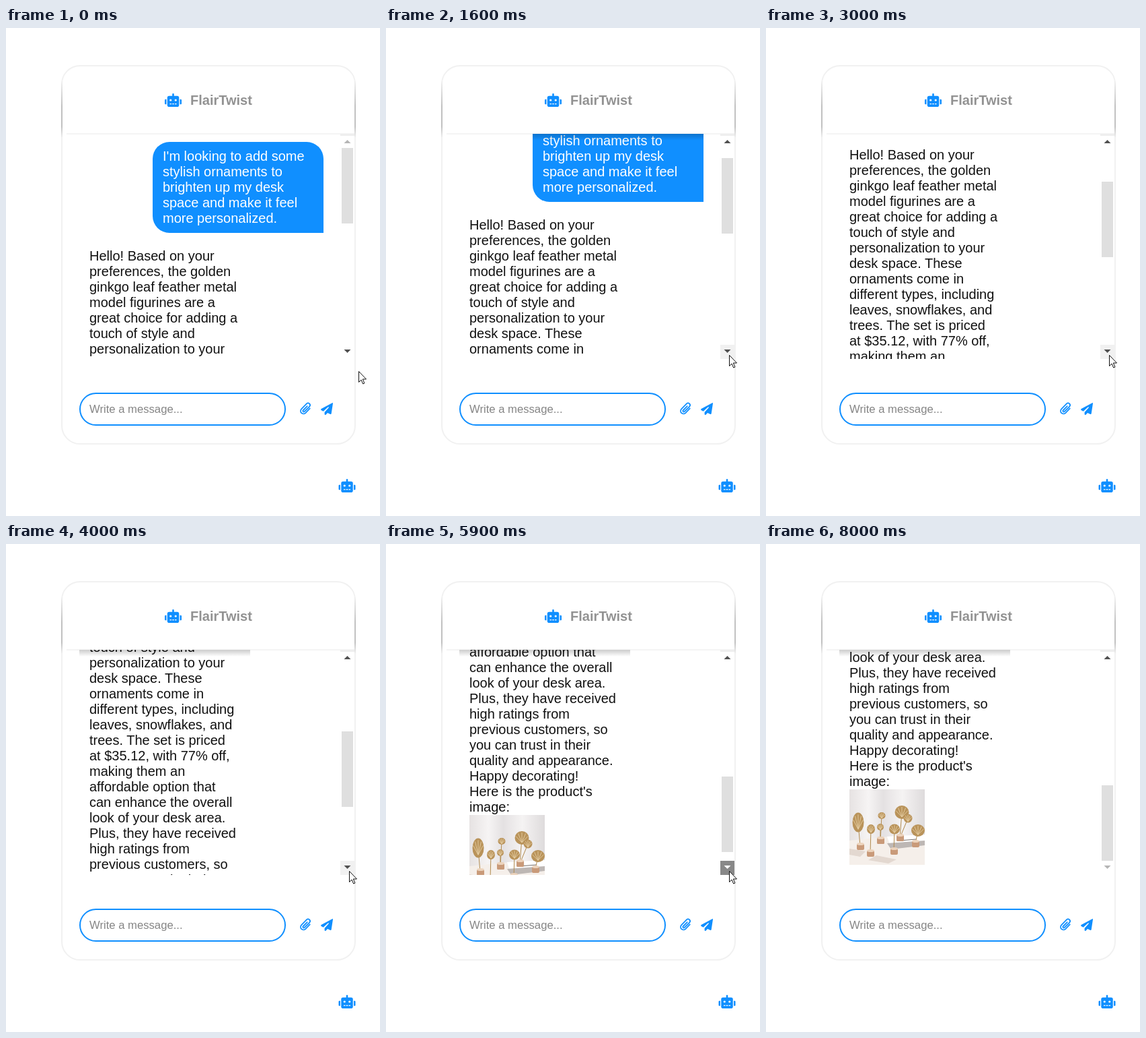
These frames come from a looping animation (556 by 724 pixels, 8100 ms). An HTML page:

```html
<!DOCTYPE html>
<html lang="en">
<head>
<meta charset="utf-8">
<title>Chat</title>
<style>
  html, body { margin: 0; width: 100%; height: 100%; overflow: hidden; background: #fff; }
  body { position: relative; font: 20px/23px "Liberation Sans", Arial, sans-serif; }
  body *, .bubble::after { box-sizing: border-box; }
  .panel, .edge, .line, .view, .input, h1, .stage, .bubble, .bubble::after { position: absolute; }
  .panel { left: 82px; top: 55px; width: 438px; height: 563px; border: 2px solid #f1f1f1; border-radius: 28px; }
  .edge { top: 78px; width: 2px; height: 85px; background: linear-gradient(#0000, #0003 45%, #0003 80%, #0000); }
  .line { left: 90px; top: 156px; width: 428px; height: 2px; background: #f4f4f4; }
  h1 { left: 274px; top: 96px; margin: 0; font-size: 20px; line-height: 23px; color: #929292; }
  .view { left: 84px; top: 157px; width: 412px; height: 334px; overflow: hidden; }
  .bubble { width: 254px; padding: 10px 15px; white-space: pre; overflow: hidden; }
  .bubble::after { content: ""; left: 0; top: calc(var(--s) - var(--y)); width: 100%; height: 10px;
    background: linear-gradient(#0003, #0000); }
  .user { --y: 12px; left: 134px; top: 12px; color: #fff; background: #108fff; border-radius: 25px 25px 0 25px; }
  .bot { --y: 160px; left: 25px; top: 160px; color: #111; background: #fff; border-radius: 25px 25px 25px 0; }
  .bot svg { display: block; }
  .input { left: 109px; top: 541px; width: 307px; height: 49px; padding-left: 13px; border: 2px solid #108fff;
    border-radius: 25px; font-size: 16.67px; line-height: 45px; color: #858585; }
  .stage { left: 0; top: 0; }
</style>
</head>
<body>
<div class="panel"></div>
<div class="edge" style="left:82px"></div>
<div class="edge" style="left:518px"></div>
<div class="line"></div>
<h1>FlairTwist</h1>

<div class="view"><div id="log">
<div class="bubble user">I'm looking to add some
stylish ornaments to
brighten up my desk
space and make it feel
more personalized.</div>
<div class="bubble bot">Hello! Based on your
preferences, the golden
ginkgo leaf feather metal
model figurines are a
great choice for adding a
touch of style and
personalization to your
desk space. These
ornaments come in
different types, including
leaves, snowflakes, and
trees. The set is priced
at $35.12, with 77% off,
making them an
affordable option that
can enhance the overall
look of your desk area.
Plus, they have received
high ratings from
previous customers, so
you can trust in their
quality and appearance.
Happy decorating!
Here is the product's
image:<svg width="112" height="112">
  <defs><linearGradient id="wall"><stop stop-color="#e6e2e2"/><stop offset=".25" stop-color="#f6f4f4"/>
    <stop offset=".45" stop-color="#e4e1e2"/><stop offset=".7" stop-color="#f5f3f3"/><stop offset="1" stop-color="#dedbdc"/></linearGradient></defs>
  <path fill="url(#wall)" d="M0 0h112v112H0z"/>
  <path fill="#f5efea" d="M0 76l60-6 52 10v32H0z"/>
  <path fill="#e3d8d0" d="M0 88l24 4-8 8-16-3zM40 98l30 6-12 6-30-5z"/>
  <path fill="#fff" d="M56 70l56-3v15l-50 6z"/>
  <path fill="#bdb7b4" d="M56 80l56-4v7l-50 6z"/>
  <path stroke="#77706c" d="M75 76l24-2"/>
  <g id="plants"></g>
</svg></div>
</div></div>

<div class="input">Write a message...</div>

<svg class="stage" width="556" height="724">
  <defs>
    <g id="robot" fill="#108fff">
      <path d="M11.2 4V1.3a1.3 1.3 0 0 1 2.6 0V4zM2.5 8.8v7.5H1.2A1.2 1.2 0 0 1 0 15v-5a1.2 1.2 0 0 1 1.2-1.2zM22.5 8.8v7.5h1.3A1.2 1.2 0 0 0 25 15v-5a1.2 1.2 0 0 0-1.2-1.2z"/>
      <rect x="3.75" y="3.75" width="17.5" height="16.25" rx="2.8"/>
      <g fill="#fff"><circle cx="8.75" cy="10" r="1.6"/><circle cx="16.25" cy="10" r="1.6"/>
        <path d="M7.5 15H10v1.25H7.5zM11.25 15h2.5v1.25h-2.5zM15 15h2.5v1.25H15z"/></g>
    </g>
  </defs>
  <use href="#robot" x="236" y="97"/>
  <use href="#robot" x="494.5" y="669"/>
  <path transform="translate(436.5 553.7) scale(1.13)" fill="none" stroke="#108fff" stroke-width="1.6" stroke-linecap="round"
    d="M13.5 9.5L7.6 15.6a3.75 3.75 0 0 1-5.3-5.3L9.2 3.2a2.69 2.69 0 0 1 3.8 3.8L6.3 13.7a1.2 1.2 0 0 1-1.7-1.7L10 6.6"/>
  <path transform="translate(468 556)" fill="#108fff"
    d="M17 .2q1.1-.4 1 .9l-2.3 15q-.3 1.2-1.5.8L10 15l-2.5 2.7q-1.6 1-1.9-.8v-3L11.9 7q.1-1-1-.7l-7.2 6.4L.6 11.1q-1.2-1 0-2z"/>
  <path fill="#eee" d="M497 157h21v3h-21z"/>
  <path id="button" d="M497 470h21v21h-21z"/>
  <path id="up" d="M502.5 171l5-5 5 5z"/>
  <path id="down" d="M502.5 477h10l-5 5z"/>
  <rect id="thumb" x="499" width="17" height="112" fill="#dfdfdf"/>
  <path id="cursor" fill="#fff" stroke="#111" d="M.5.5V16.5L4 13l2.7 6 2.2-1L6.3 12H11.5Z"/>
</svg>

<script>
const $ = id => document.getElementById(id);
const LOOP = 8100, MAX = 538, STEP = 50;
const clicks = [1500, 2050, 2600, 3110, 3450, 3750, 4250, 4600, 5150, 5700, 6100];

const clamp = u => Math.min(1, Math.max(0, u));
const easeOut = u => 1 - (1 - clamp(u)) ** 3;
const smooth = u => (u = clamp(u), u * u * (3 - 2 * u));
const lerp = (a, b, u) => Math.round(a + (b - a) * u);
const fill = (id, color) => $(id).setAttribute('fill', color);

// Gold ornaments: head x, y, width, height; base x, y
$('plants').innerHTML = [
  [13, 49, 17, 29, 16, 85], [32, 59, 12, 14, 31, 95], [48, 39, 11, 10, 46, 76], [46, 56, 10, 10, 46, 76],
  [67, 59, 16, 15, 66, 92], [78, 34, 21, 20, 75, 72], [87, 43, 13, 13, 75, 72], [102, 61, 20, 18, 98, 81]
].map(([x, y, w, h, bx, by]) => {
  let veins = '';
  for (let i = 0; i < 5; i++) {
    const a = Math.PI * (1.1 + i * .2);
    veins += `M${x} ${y + h * .35}L${x + Math.cos(a) * w * .45} ${y + Math.sin(a) * h * .4}`;
  }
  return `<path stroke="#b18a4e" d="M${x} ${y}L${bx} ${by}"/>
    <ellipse cx="${x}" cy="${y}" rx="${w / 2}" ry="${h / 2}" fill="#b9935a"/>
    <path d="${veins}" stroke="#e6cfa4" stroke-width=".9"/>
    <rect x="${bx - 5}" y="${by - 4}" width="11" height="9" rx="2" fill="#c99a79"/>
    <ellipse cx="${bx + .5}" cy="${by - 4}" rx="5.5" ry="2" fill="#ecd3bc"/>`;
}).join('');

function draw(t) {
  const scroll = Math.min(MAX, Math.round(clicks.reduce((s, c) => s + STEP * easeOut((t - c) / 180), 0)));
  $('log').style.cssText = `transform:translateY(${-scroll}px);--s:${scroll}px`;
  $('thumb').setAttribute('y', 178 + Math.round(scroll * 180 / MAX));

  // Later presses are held longer
  const pressed = clicks.some(c => t >= c && t - c <= (c > 4000 ? 250 : 60));
  const hover = t >= 900 && t < 6500;
  fill('button', pressed ? '#888' : hover ? '#f1f1f1' : '#fff');
  fill('up', scroll ? '#505050' : '#b5b5b5');
  fill('down', pressed ? '#fff' : scroll < MAX ? '#505050' : '#b5b5b5');

  const enter = smooth(t / 1000), leave = smooth((t - 6300) / 700);
  const x = lerp(524, 510, enter) + lerp(0, -26, leave);
  const y = lerp(509, 485, enter) + lerp(0, -18, leave);
  $('cursor').setAttribute('transform', `translate(${x} ${y})`);
  $('cursor').style.display = t < 7200 ? '' : 'none';
}

const start = performance.now();
function tick() {
  const t = (performance.now() - start) % LOOP;
  draw(Math.floor(t / 100) * 100);
  requestAnimationFrame(tick);
}
tick();
</script>
</body>
</html>
```
